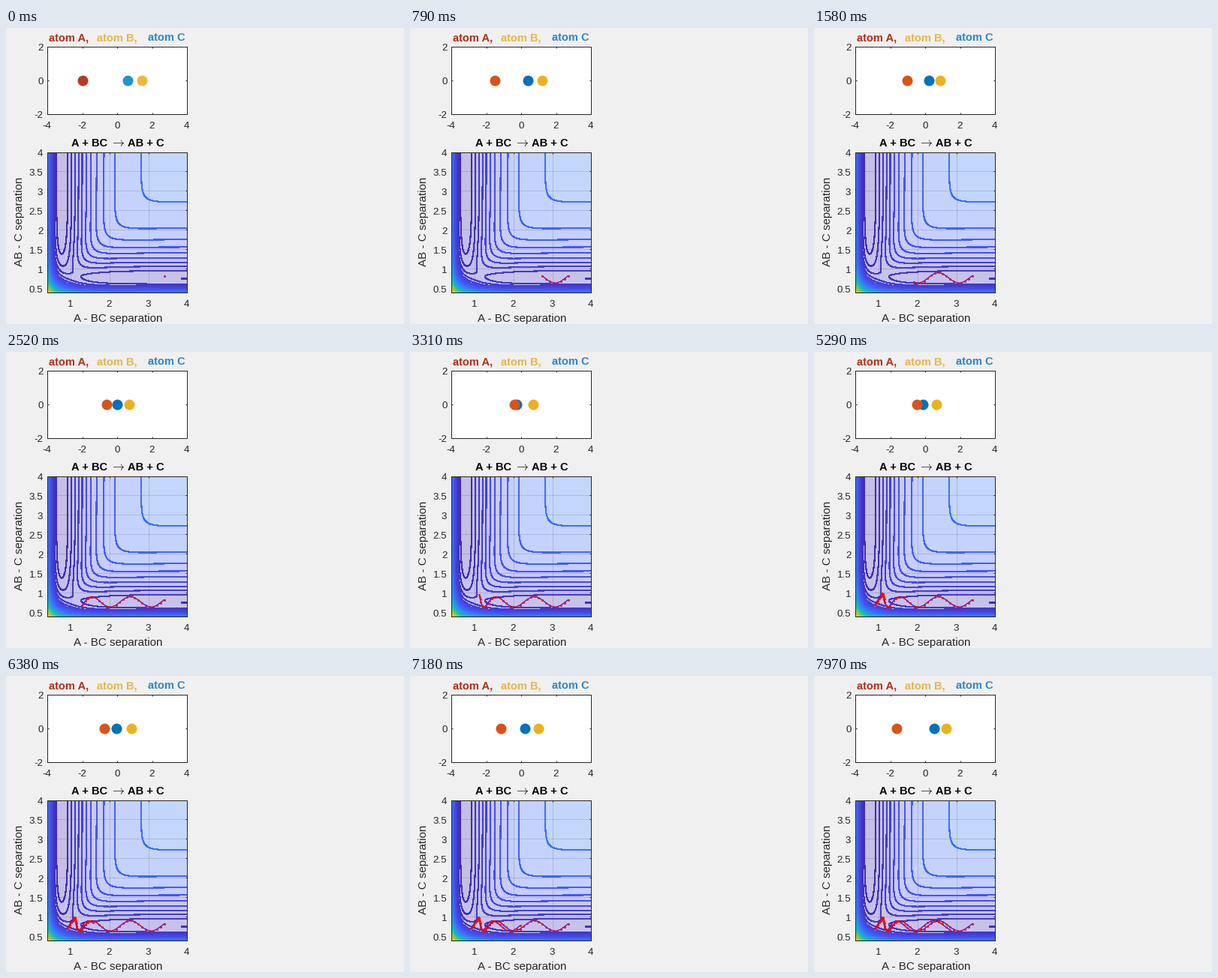
A matplotlib script for the animation above (8000 ms loop, 530 by 395 pixels).

```python
import numpy as np
import matplotlib.pyplot as plt
from matplotlib.animation import FuncAnimation
from matplotlib.colors import LinearSegmentedColormap

W, H, DPI = 530, 395, 100
PX = 72 / DPI                       # one pixel in points
INTERVAL, FRAMES = 40, 200
INK = "#262626"

plt.rcParams["font.family"] = "Liberation Sans"
plt.rcParams["mathtext.fontset"] = "cm"

fig = plt.figure(figsize=(W / DPI, H / DPI), dpi=DPI, facecolor="#f0f0f0")


# ---------- layout helpers ----------
def put(x, y, s, size=13.33, ha="center", va="baseline", color=INK, **kw):
    fig.text(x / W, 1 - y / H, s, fontsize=size * PX, ha=ha, va=va,
             color=color, **kw)


def make_axes(left, top, right, bottom, xlim, ylim, xticks, yticks):
    """Axes whose frame lies on the given pixel columns and rows."""
    # Just short of pixel centres, so that snapping keeps the pixel.
    left, right = left + 0.49, right + 0.49
    top, bottom = top + 0.51, bottom + 0.51
    ax = fig.add_axes([left / W, 1 - bottom / H,
                       (right - left) / W, (bottom - top) / H])
    ax.set(xlim=xlim, ylim=ylim, xticks=xticks, yticks=yticks)
    ax.tick_params(direction="in", length=2 * PX, width=PX, color=INK,
                   top=True, right=True, labelbottom=False, labelleft=False)
    for spine in ax.spines.values():
        spine.set(linewidth=PX, color=INK)
    for v in xticks:
        x = left + (v - xlim[0]) / (xlim[1] - xlim[0]) * (right - left)
        put(x - 0.8, bottom + 19, f"{v:g}")
    for v in yticks:
        y = bottom - (v - ylim[0]) / (ylim[1] - ylim[0]) * (bottom - top)
        put(49.5, y + 5.2, f"{v:g}", ha="right")
    return ax


top_ax = make_axes(55, 24, 241, 114, (-4, 4), (-2, 2),
                   np.arange(-4, 5, 2), np.arange(-2, 3, 2))
map_ax = make_axes(55, 165, 241, 352, (0.4, 4), (0.4, 4),
                   np.arange(1, 5), np.arange(0.5, 4.1, 0.5))

BOLD = dict(size=14.67, weight="bold")
put(57, 17, "atom A,", ha="left", color="#b03018", **BOLD)
put(121, 17, "atom B,", ha="left", color="#e9b54a", **BOLD)
put(189, 17, "atom C", ha="left", color="#2e86c9", **BOLD)
put(87, 158, "A + BC", ha="left", color="black", **BOLD)
put(149.3, 158, r"$\rightarrow$", 16, color="black")
put(211, 158, "AB + C", ha="right", color="black", **BOLD)
put(148.7, 392, "A - BC separation", 15.1)
put(18, 258.5, "AB - C separation", 15.1, va="center", rotation=90)


# ---------- potential energy surface ----------
def bond(r, depth):
    """Coulomb and exchange parts of a Morse bond."""
    z = np.exp(-2 * (r - 0.75))
    return depth * (3 * z**2 - 2 * z) / 4, depth * (z**2 - 6 * z) / 4


def potential(x, y):
    q1, j1 = bond(x, 1.0)
    q2, j2 = bond(y, 0.829)
    q3, j3 = bond(x + y, 0.6)
    mix = j1**2 + j2**2 + j3**2 - j1 * j2 - j2 * j3 - j1 * j3
    return q1 + q2 + q3 - np.sqrt(np.maximum(mix, 0))


heat = LinearSegmentedColormap.from_list("heat", [
    (0.00, "#3e26a8"), (0.17, "#4852f4"), (0.29, "#2e87f7"),
    (0.46, "#12beb9"), (0.65, "#81cc59"), (0.76, "#c8c129"),
    (0.87, "#ffc337"), (1.00, "#f9fb15")])
pale = LinearSegmentedColormap.from_list(
    "pale", 1 - 0.3 * (1 - heat(np.linspace(0, 1, 64))[:, :3]))

axis = np.linspace(0.4, 4, 181)
gx, gy = np.meshgrid(axis, axis)
energy = potential(gx, gy)
scale = dict(levels=-0.0316 + 0.0885 * np.arange(-11, 31),
             vmin=-1.02, vmax=3.1)
map_ax.contourf(gx, gy, energy, cmap=pale, extend="both", zorder=0, **scale)
map_ax.contour(gx, gy, energy, cmap=heat, linewidths=1.1 * PX,
               antialiased=False, zorder=1.5, **scale)
map_ax.grid(True, color=INK, alpha=0.16, linewidth=PX)
map_ax.set_axisbelow(True)

# ---------- trajectory: approach, bounce at TURN, retreat ----------
STEPS, TURN = np.arange(77), 41
away = np.abs(STEPS - TURN)

# Free flight far out, a soft stop at the barrier and a short dip inside.
path_x = (1.08 + 0.337 * np.logaddexp(0, (away - 16.9) / 3.5)
          - 0.17 * np.exp(-(away / 4.5)**2))

# Bond vibration, delayed near the barrier and stretched there.
delay = np.where(STEPS < TURN, 0.76, 0.54)
half_turns = away / 5.55 - delay * np.tanh(away / 12)
path_y = (0.767 - 0.135 * np.cos(np.pi * half_turns)
          + 0.095 * np.exp(-(away / 11)**4))

atom_b = (path_x + path_y) / 3      # equal masses, fixed centre of mass
atom_a, atom_c = atom_b - path_x, atom_b - path_y

# ---------- moving parts ----------
trail, = map_ax.plot([], [], "-", color="#1414f0", lw=1.2 * PX, zorder=4)
dots, = map_ax.plot([], [], "o", ms=3 * PX, mew=0, zorder=5)
balls = [top_ax.plot([], [], "o", ms=14 * PX, mew=0, zorder=z)[0]
         for z in (5, 3, 4)]
START_COLORS = ("#b93a22", "#f0b640", "#2792c9")
BALL_COLORS = ("#d95319", "#edb120", "#0072bd")
TICK = 78.7                         # display refresh in ms


def step_at(ms):
    """Steps done by a time; they slow down a little as the trail grows."""
    tick = int(ms / TICK)
    return min(round(tick * (0.801 - 0.00048 * tick)), STEPS[-1])


def update(frame):
    n = step_at((frame + 0.5) * INTERVAL)
    for line in (trail, dots):
        line.set_data(path_x[:n + 1], path_y[:n + 1])
    dots.set_color("#ff0000" if n else "#b0203a")
    colors = BALL_COLORS if n else START_COLORS
    for ball, pos, color in zip(balls, (atom_a, atom_b, atom_c), colors):
        ball.set_data([pos[n]], [0])
        ball.set_color(color)
    return [trail, dots, *balls]


anim = FuncAnimation(fig, update, frames=FRAMES, interval=INTERVAL,
                     repeat=True, repeat_delay=0)
plt.show()
```
